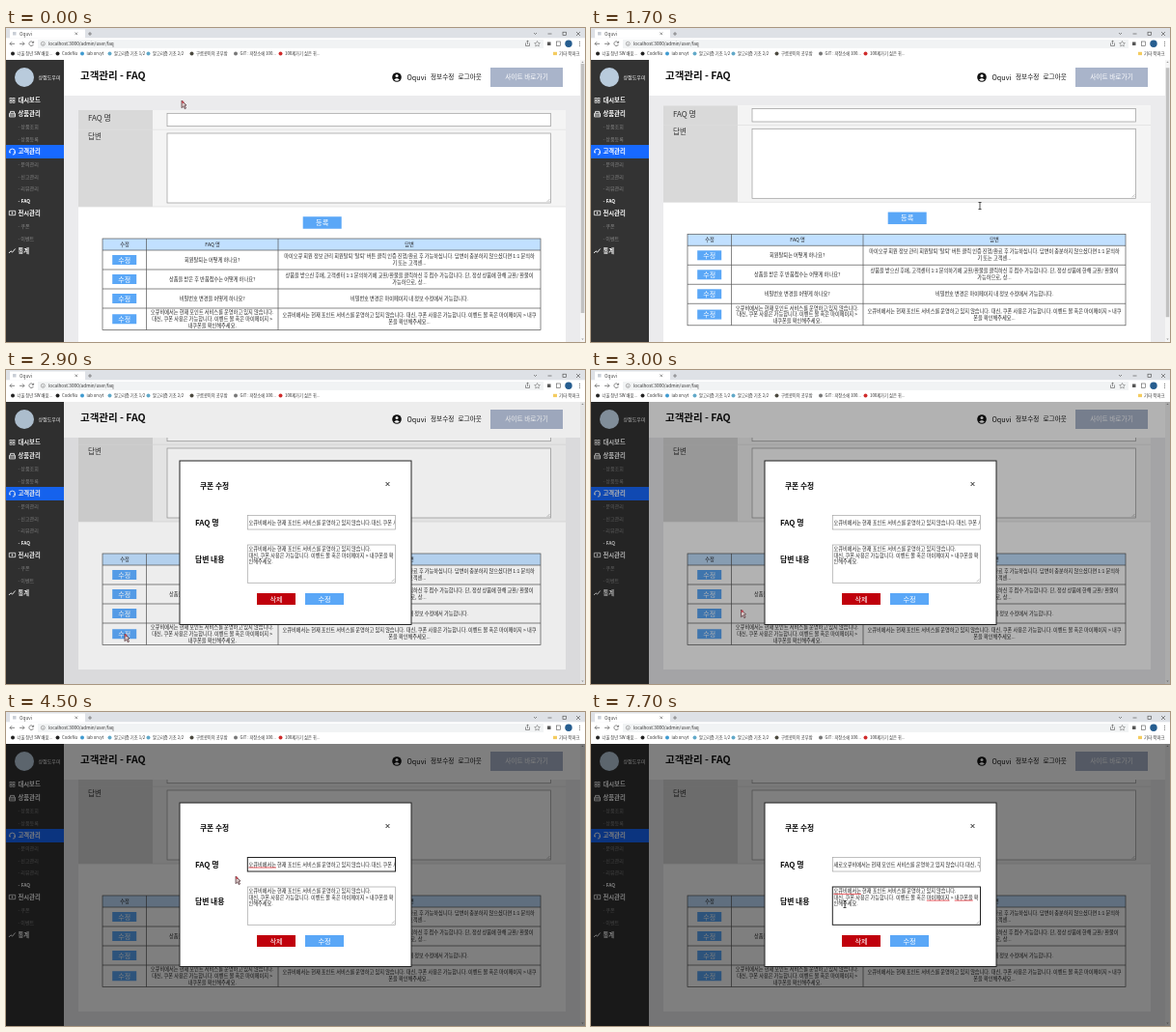
Animation, 600 px wide and 325 px high, one loop 8000 ms. Source, as an HTML page with a canvas:

```html
<!DOCTYPE html>
<html lang="ko">
<head>
<meta charset="utf-8">
<title>FAQ</title>
<style>
html, body { margin: 0; width: 100%; height: 100%; overflow: hidden; background: #fff; }
canvas { display: block; width: 100vw; height: 100vh; }
</style>
</head>
<body>
<canvas id="stage"></canvas>
<script>
const W = 600, H = 325, LOOP = 8000, PAGE_TOP = 33;
const FONT = '"Noto Sans CJK KR", "Noto Sans CJK", "Noto Sans", sans-serif';
const BLUE = '#5aa7f7';
const canvas = document.getElementById('stage');
const ctx = canvas.getContext('2d');

// time, x, y, shape
const POINTER = [
  [0, 184, 79, 'arrow'], [300, 270, 118, 'beam'], [700, 422, 185, 'beam'],
  [1000, 422, 185, 'beam'], [1100, 422, 195, 'beam'], [1400, 422, 195, 'beam'],
  [1500, 403, 184, 'beam'], [1700, 403, 184, 'beam'], [1800, 370, 194, 'arrow'],
  [1900, 329, 205, 'arrow'], [2500, 128, 273, 'arrow'], [2700, 125, 277, 'arrow'],
  [2900, 125, 277, 'arrow'], [3100, 190, 227, 'arrow'], [3700, 203, 222, 'arrow'],
  [4000, 262, 158, 'beam'], [4200, 240, 174, 'arrow'], [6600, 240, 174, 'arrow'],
  [6800, 252, 186, 'beam'], [7100, 263, 199, 'beam']
];
const SCROLL = [[0, 0], [1700, 4.7], [1800, 20], [1900, 28]];
const SHADE = [[0, 0], [2900, .07], [3000, .3], [3100, .5]];
const TYPED = [[0, ''], [4700, 'ㅅ'], [4800, '새'], [5200, '샐'], [5300, '새로']];
const FOCUS = [[0, ''], [4000, 'input'], [7100, 'area']];
const CARET_RESETS = [0, 4000, 4700, 4800, 5200, 5300, 7100].map(t => [t]);
const MODAL_AT = 2900;

const BRAND = '오큐비에서는';
const NOTICE = BRAND + ' 현재 포인트 서비스를 운영하고 있지 않습니다.';
const COUPON = '대신, 쿠폰 사용은 가능합니다. 이벤트 몰 혹은 마이페이지 >';

const ROWS = [
  [230, 250, ['회원탈퇴는 어떻게 하나요?'],
    ["마이오큐 회원 정보 관리 회원탈퇴 '탈퇴' 버튼 클릭 인증 진행/완료 후 가능하십니다. 답변이 충분하지 않으셨다면 1:1 문의하", '기 또는 고객센...']],
  [250, 270, ['상품을 받은 후 반품접수는 어떻게 하나요?'],
    ['상품을 받으신 후에, 고객센터 1:1 문의하기에 교환/환불을 클릭하신 후 접수 가능합니다. 단, 정상 상품에 한해 교환/ 환불이', '가능하므로, 상...']],
  [270, 290, ['비밀번호 변경을 어떻게 하나요?'], ['비밀번호 변경은 마이페이지 내 정보 수정에서 가능합니다.']],
  [290, 312.5, [NOTICE, COUPON, '내쿠폰을 확인해주세요.'],
    [NOTICE + ' ' + COUPON + ' 내쿠', '폰을 확인해주세요...']]
];

const MENU = [
  [75, '대시보드', 'grid'], [89, '상품관리', 'bag'], [102, '상품조회'], [115, '상품등록'],
  [128, '고객관리', 'head'], [141, '문의관리'], [154, '신고관리'], [166, '리뷰관리'], [179, 'FAQ'],
  [191.5, '전시관리', 'card'], [205, '쿠폰'], [218, '이벤트'], [231, '통계', 'chart']
];

const BOOKMARKS = [
  [7, '너울 청년 SW 배움...', '#222'], [53.5, 'CodeNu', '#222'], [79, 'lab orvyt', '#3f9ad0'],
  [107.5, '알고리즘 기초 1/2', '#62a9c9'], [147.5, '알고리즘 기초 2/2', '#62a9c9'],
  [192.5, '구름콩이의 공부방', '#4c4a40'], [238, 'GIT : 저장소에 100...', '#777'], [284.5, '100제가기 싫은 귀...', '#d02c2c']
];

const stepAt = (table, t) => table.filter(row => row[0] <= t).pop();

function pointerAt(t) {
  const a = stepAt(POINTER, t);
  const b = POINTER[POINTER.indexOf(a) + 1] || a;
  const k = b === a ? 0 : (t - a[0]) / (b[0] - a[0]);
  return [a[1] + (b[1] - a[1]) * k, a[2] + (b[2] - a[2]) * k, a[3]];
}

function rect(x, y, w, h, fill, stroke, line = .7) {
  if (fill) { ctx.fillStyle = fill; ctx.fillRect(x, y, w, h); }
  if (stroke) { ctx.strokeStyle = stroke; ctx.lineWidth = line; ctx.strokeRect(x, y, w, h); }
}

function text(str, x, y, size, color = '#333', align = 'left', weight = 400) {
  ctx.font = `${weight} ${size}px ${FONT}`;
  ctx.textAlign = align;
  ctx.textBaseline = 'alphabetic';
  ctx.fillStyle = color;
  ctx.fillText(str, x, y + size * .37);
}

function lines(list, x, y, gap, size, color, align) {
  list.forEach((s, i) => text(s, x, y + (i - (list.length - 1) / 2) * gap, size, color, align));
}

function disc(x, y, r, fill) {
  ctx.beginPath();
  ctx.arc(x, y, r, 0, 7);
  ctx.fillStyle = fill;
  ctx.fill();
}

function path(d, color, line = .7, fill) {
  const p = new Path2D(d);
  if (fill) { ctx.fillStyle = fill; ctx.fill(p); }
  if (color) { ctx.strokeStyle = color; ctx.lineWidth = line; ctx.stroke(p); }
}

function button(label, cx, cy, w, h, fill, size) {
  rect(cx - w / 2, cy - h / 2, w, h, fill);
  text(label, cx, cy, size, '#fff', 'center', 500);
}

function grip(x, y) {
  path(`M${x - 4} ${y - 1}l3 -3M${x - 2} ${y - 1}l1 -1`, '#888', .5);
}

function drawBrowser() {
  rect(0, 0, W, 10.5, '#dee1e6');
  rect(4, 1.5, 78, 9, '#fff');
  rect(7, 4, 3.5, 3.5, '#c9ced6');
  text('Oquvi', 14, 6, 4.7, '#444');
  path('M71.5 4.5l2.6 2.6m0 -2.6l-2.6 2.6M85 6h4M87 4v4', '#555', .6);
  path('M547 5l1.5 1.5l1.5 -1.5M561.5 6h4M591 4l4 4m0 -4l-4 4', '#444', .6);
  rect(577, 4.2, 3.4, 3.4, null, '#444', .6);

  rect(0, 10.5, W, PAGE_TOP - 10.5, '#fff');
  rect(33, 12, 524, 9, '#f1f3f4');
  path('M9 16.3h-5m2 -2l-2 2l2 2M14 16.3h5m-2 -2l2 2l-2 2', '#555', .7);
  path('M28.2 15a2.3 2.3 0 1 0 .2 2M28.6 13.7v1.7h-1.7', '#555', .7);
  path('M40.3 16.3a2 2 0 1 0 -4 0a2 2 0 1 0 4 0M38.3 16v1.4', '#666', .5);
  text('localhost:3000/admin/user/faq', 44, 16.2, 4.7, '#333');
  path('M538.5 15.5v3h4v-3M540.5 17v-4m-1.2 1.2l1.2 -1.2l1.2 1.2', '#555', .6);
  path('M550.5 13.5l.9 1.9l2 .2l-1.5 1.4l.4 2l-1.8 -1l-1.8 1l.4 -2l-1.5 -1.4l2 -.2z', '#666', .5);
  rect(561, 14.5, 3.5, 3.5, '#555');
  rect(570.5, 14, 4, 4.4, null, '#555', .6);
  disc(583, 16.2, 3.7, '#265d8f');
  [14.2, 16.2, 18.2].forEach(y => disc(594.5, y, .5, '#444'));

  BOOKMARKS.forEach(([x, label, color]) => {
    disc(x, 26.5, 2, color);
    text(label, x + 4.5, 26.5, 4.3, '#333');
  });
  rect(567, 24.8, 4, 3.3, '#f4cc60');
  text('기타 북마크', 573, 26.5, 4.5, '#333');
}

function menuIcon(kind, y) {
  const c = '#fff';
  if (kind === 'grid') [[4, -2.5], [7, -2.5], [4, .5], [7, .5]].forEach(([x, d]) => rect(x, y + d, 2, 2, null, c, .6));
  if (kind === 'bag') path(`M3.5 ${y - .7}h6v3.6h-6zM4.5 ${y - 1}v-1.6h4v1.6M3.5 ${y + 1}h6`, c, .8);
  if (kind === 'head') path(`M3.6 ${y + 1}v-1a2.9 2.9 0 0 1 5.8 0v1.7q0 1.3 -2.5 1.3M4.2 ${y - .2}v1.8M8.8 ${y - .2}v1.8`, c, .9);
  if (kind === 'card') path(`M3.3 ${y - 2.2}h6.4v4.4h-6.4zM6.5 ${y - 1}v2M5.5 ${y}h2`, c, .8);
  if (kind === 'chart') path(`M3 ${y + 2}l2 -2.2l1.6 1.3l3 -3.6`, c, .9);
}

function drawSidebar() {
  rect(0, PAGE_TOP, 60, H - PAGE_TOP, '#333');
  disc(19, 51, 10, '#b9cbdc');
  text('상점도우미', 33.5, 51, 5, '#fff');
  rect(0, 121, 60, 14, '#1769ff');
  MENU.forEach(([y, label, icon]) => {
    if (icon) {
      menuIcon(icon, y);
      text(label, 12.5, y, 6.3, '#fff', 'left', 700);
    } else {
      const active = label === 'FAQ';
      text('- ' + label, 12.5, y, 5, active ? '#fff' : '#858585', 'left', active ? 700 : 400);
    }
  });
}

function drawHeader() {
  rect(60, PAGE_TOP, 535, 70 - PAGE_TOP, '#fff');
  text('고객관리 - FAQ', 77, 48.8, 10.5, '#111', 'left', 700);
  disc(405, 51, 4.8, '#111');
  disc(405, 49.5, 1.5, '#fff');
  path('M402.2 53.6q2.8 -3 5.6 0q-2.8 2.4 -5.6 0z', null, 0, '#fff');
  text('Oquvi', 415.5, 51, 7.2, '#111');
  text('정보수정', 440, 51, 6.6, '#111');
  text('로그아웃', 468.5, 51, 6.6, '#111');
  button('사이트 바로가기', 539.5, 51, 75, 20, '#a9b4ca', 6.7);
}

function drawContent(scroll, locked) {
  ctx.save();
  ctx.beginPath();
  ctx.rect(60, 70, 535, 255);
  ctx.clip();
  rect(60, 70, 535, 255, '#ebebed');
  ctx.translate(0, -scroll);

  rect(75, 85, 505, 253, '#fff');
  rect(152, 85, 428, 100, '#f4f4f4');
  rect(75, 85, 77, 100, '#d9d9d9');
  path('M75 105.2H580M75 185H580', '#dedede', .7);
  text('FAQ 명', 85, 93.5, 8, '#333');
  text('답변', 85, 112, 7.5, '#333');
  rect(167, 88.3, 397.5, 13.4, '#fff', '#999');
  rect(167, 109, 397.5, 72, '#fff', '#999');
  grip(564.5, 181);
  button('등록', 327.7, 201.5, 40, 12.5, BLUE, 7.2);

  rect(100, 218, 454, 12, '#c1e0ff');
  [['수정', 123], ['FAQ 명', 214], ['답변', 418]].forEach(([s, x]) => text(s, x, 223.8, 5.2, '#222', 'center', 500));
  ROWS.forEach(([top, bottom, question, answer]) => {
    const mid = (top + bottom) / 2;
    button('수정', 122.7, mid, 25, 10, BLUE, 7);
    lines(question, 213.7, mid, 6.9, 5.2, '#222', 'center');
    lines(answer, 418, mid - .3, 7, 5.17, '#222', 'center');
    path(`M100 ${top}H554`, '#555', .7);
  });
  rect(100, 218, 454, 94.5, null, '#555', .7);
  path('M145.5 218V312.5M282 218V312.5', '#555', .7);
  ctx.restore();

  rect(595, PAGE_TOP, 5, H - PAGE_TOP, '#f5f5f5');
  if (!locked) rect(595.7, 37 + scroll * .9, 3.6, 258, '#c1c1c1');
  path('M596.3 36l1.2 -1.5l1.2 1.5zM596.3 321.5l1.2 1.5l1.2 -1.5z', null, 0, '#999');
}

function widthOf(str, size) {
  ctx.font = `400 ${size}px ${FONT}`;
  return ctx.measureText(str).width;
}

function spelling(before, word, x, y, size) {
  const left = x + widthOf(before, size);
  path(`M${left} ${y}h${widthOf(word, size)}`, '#e3262e', .75);
}

function drawModal(t) {
  const size = 5.17, left = 251.5;
  const focus = stepAt(FOCUS, t)[1];
  const typed = stepAt(TYPED, t)[1];
  const caretOn = Math.floor((t - stepAt(CARET_RESETS, t)[0]) / 500) % 2 === 0;
  const field = (name, y, h) => rect(250.3, y, 153.2, h, '#fff', focus === name ? '#222' : '#a4a4a4', focus === name ? 1 : .7);

  rect(180, 94, 240, 169.5, '#fff', '#222', 1);
  text('쿠폰 수정', 201, 120, 7.7, '#111', 'left', 700);
  path('M393.6 116l3.8 4m0 -4l-3.8 4', '#111', .9);
  text('FAQ 명', 196, 158, 8, '#111', 'left', 700);
  text('답변 내용', 196, 196, 7.8, '#111', 'left', 700);

  field('input', 150.5, 14.5);
  ctx.save();
  ctx.beginPath();
  ctx.rect(251, 151.5, 151.8, 12.5);
  ctx.clip();
  text(typed + NOTICE + '대신, 쿠폰 사용은 가능합니다.', left, 157.8, size, '#222');
  if (focus === 'input') {
    if ((t >= 4200 && t < 4700) || t >= 5900) spelling('', typed + BRAND, left, 161, size);
    if (caretOn) rect(left + widthOf(typed, size), 154.8, .6, 6.4, '#111');
  }
  ctx.restore();

  field('area', 181, 39.3);
  grip(403.5, 220.3);
  const wrapped = COUPON + ' 내쿠폰을 확';
  lines([NOTICE, wrapped, '인해주세요.'], left, 191.8, 6.7, size, '#222', 'left');
  if (focus === 'area') {
    spelling('', BRAND, left, 188.4, size);
    if (t >= 7500) {
      spelling(COUPON.split('마이')[0], '마이페이지', left, 195.1, size);
      spelling(COUPON + ' ', '내쿠폰을', left, 195.1, size);
    }
    if (caretOn) rect(left + widthOf('인해', size), 195.4, .6, 6.2, '#111');
  }

  button('삭제', 280, 237, 40, 12, '#c0000c', 7.2);
  button('수정', 330, 237, 40, 12, BLUE, 7.2);
}

function drawPointer(x, y, shape) {
  if (shape === 'beam') {
    path(`M${x - 1.5} ${y - 3.5}h3M${x} ${y - 3.5}v7M${x - 1.5} ${y + 3.5}h3`, '#222', .8);
    return;
  }
  path(`M${x - 2} ${y - 4}l5 5l-2 .4l1.6 2.6l-1.3 .7l-1.5 -2.6l-1.8 1.6z`, '#4a2a30', .7, '#d8c4c4');
  disc(x - .8, y - 2.2, 1.2, '#c04a55');
}

function draw(now) {
  const t = Math.floor((now % LOOP) / 100) * 100;
  const ratio = window.devicePixelRatio || 1;
  const w = Math.round(innerWidth * ratio), h = Math.round(innerHeight * ratio);
  if (canvas.width !== w || canvas.height !== h) { canvas.width = w; canvas.height = h; }
  ctx.setTransform(w / W, 0, 0, h / H, 0, 0);

  const modalOpen = t >= MODAL_AT;
  drawBrowser();
  drawContent(stepAt(SCROLL, t)[1], modalOpen);
  drawHeader();
  drawSidebar();
  if (modalOpen) {
    rect(0, PAGE_TOP, W, H - PAGE_TOP, `rgba(0,0,0,${stepAt(SHADE, t)[1]})`);
    drawModal(t);
  }
  drawPointer(...pointerAt(t));
}

const start = performance.now();
function tick() {
  draw(performance.now() - start);
  requestAnimationFrame(tick);
}
tick();
</script>
</body>
</html>
```
